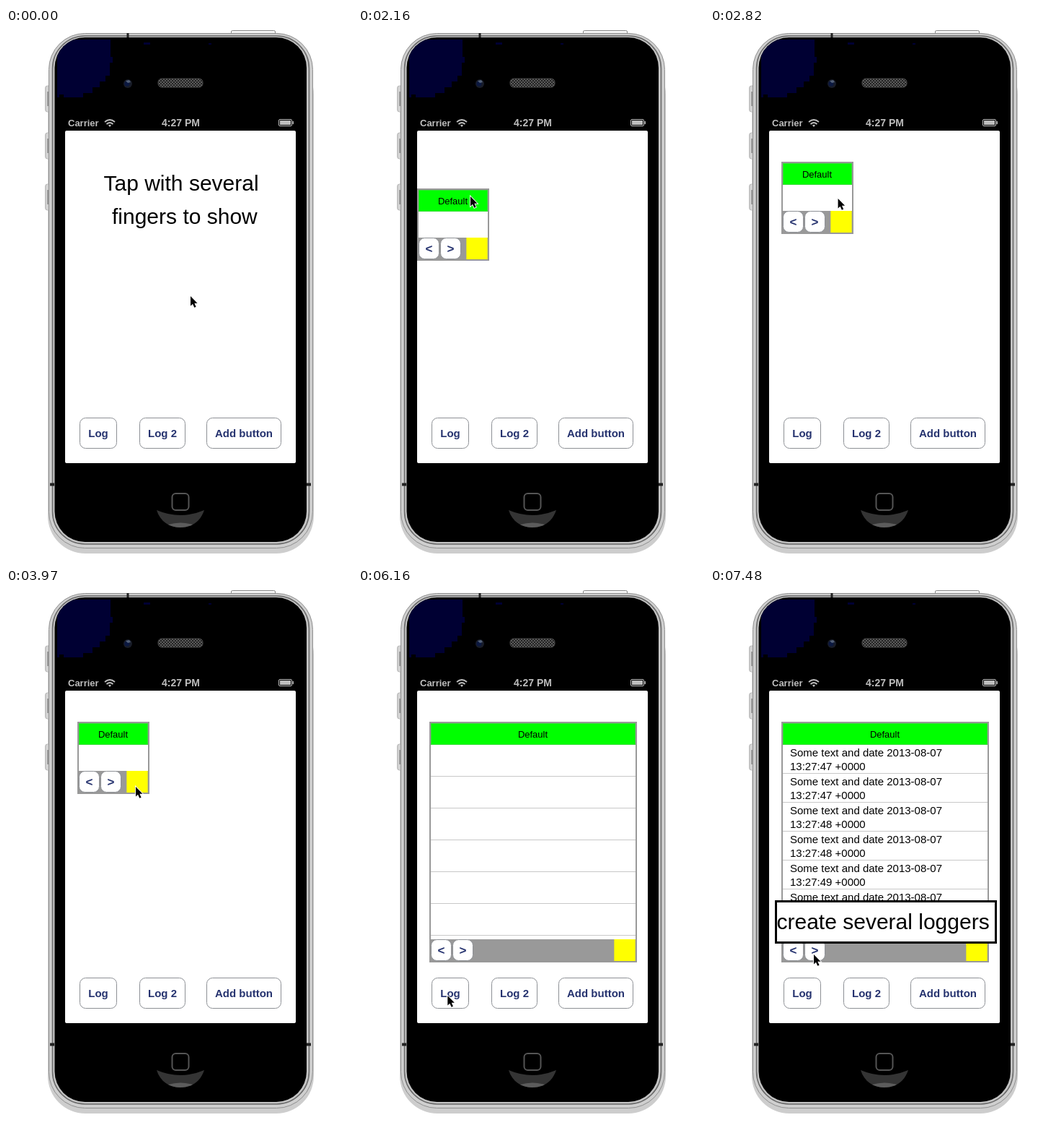
Animation, 480 px wide and 736 px high, one loop 8 s. Source, as an HTML page:

```html
<!DOCTYPE html>
<html lang="en">
<head>
<meta charset="utf-8">
<title>Log window demo</title>
<style>
html, body { margin: 0; width: 100%; height: 100%; overflow: hidden; background: #fff; }
svg { display: block; }
#stage { width: 100%; height: 100%; font-family: "Liberation Sans", Arial, sans-serif; }
.status { font-weight: bold; fill: #bdbdbd; }
.button rect { fill: #fff; stroke: #8d9095; }
.button text { font: bold 15px "Liberation Sans", Arial, sans-serif; fill: #26336f; text-anchor: middle; }
.caption { font-size: 30px; }
.edge { fill: none; stroke: #999; stroke-opacity: .35; }
#rows { font-size: 15px; }
</style>
</head>
<body>
<svg id="stage" viewBox="0 0 480 736">
  <defs>
    <pattern id="mesh" width="4" height="4" patternUnits="userSpaceOnUse">
      <path d="M0 0h4v4h-4z" fill="#222"/>
      <path d="M0 0h2v2h-2zM2 2h2v2h-2z" fill="#5c5c5c"/>
    </pattern>
    <clipPath id="face"><rect x="67.500" y="13" width="349.500" height="698" rx="42"/></clipPath>
  </defs>

  <rect x="58" y="40" width="369" height="687" rx="52" fill="#cdcdcd"/>
  <g id="keys"></g>
  <path d="M312.500 8v-3q0-1.500 2-1.500h57q2 0 2 1.500v3z" fill="#f4f4f4" stroke="#8a8a8a"/>
  <rect x="59.500" y="7.500" width="366" height="712" rx="50" fill="#cfcfcf" stroke="#8f8f8f"/>
  <rect x="64.500" y="11" width="356" height="703" rx="45" fill="#c4c4c4" stroke="#6a6a6a" stroke-width="1.500"/>
  <rect x="67.500" y="13" width="349.500" height="698" rx="42"/>
  <path d="M61 629.500h6v4h-6zM417 629.500h6v4h-6zM167.500 7h3v6h-3z" fill="#222"/>
  <path clip-path="url(#face)" fill="#000033" d="M71 16H145V40H148V48H144V66H138V74H130V82H120V90H107V96H80V92H74V96H71Z"/>
  <path d="M191 20h9v3h-9zM281 21h4v2h-4zM263 75h3v3h-3z" fill="#000033"/>
  <circle cx="169" cy="77" r="6" fill="#181c28"/>
  <circle cx="168" cy="77" r="3.500" fill="#0b1840"/>
  <path d="M166 73l5-1 2 3-4 1z" fill="#536078"/>
  <rect x="211" y="70" width="62" height="12" rx="5" fill="url(#mesh)" stroke="#444"/>
  <path d="M209 667Q242 681 275 667C270 683 257 691 242 691S214 683 209 667Z" fill="#343434"/>
  <path d="M225 687Q242 682 259 687Q251 691 242 691T225 687Z" fill="#5c5c5c"/>
  <rect x="230.500" y="644" width="23" height="23" rx="5" fill="#000" stroke="#555" stroke-width="2"/>

  <text class="status" x="86" y="136" font-size="13">Carrier</text>
  <text class="status" x="216" y="136" font-size="14">4:27 PM</text>
  <g fill="none" stroke="#bdbdbd" stroke-width="1.800">
    <path d="M137 130q7-6 14 0M139.500 133q4.500-4 9 0"/>
    <path d="M142 134.500q2-1.500 4 0l-2 2.500z" fill="#bdbdbd" stroke="none"/>
    <rect x="378.500" y="126.500" width="18" height="9" rx="1.500" stroke-width="1"/>
    <path d="M380 128h15v6h-15zM397.500 129h1.500v4h-1.500z" fill="#bdbdbd" stroke="none"/>
  </g>
  <rect x="82" y="142" width="320" height="460" rx="2" fill="#fff"/>
  <g id="buttons"></g>

  <svg id="win">
    <rect width="100%" height="100%" fill="#999"/>
    <rect id="title" x="2" y="2" height="30" fill="#0f0"/>
    <rect id="titleEdge" class="edge" x="2.500" y="2.500" height="29"/>
    <text id="name" y="22" font-size="13" text-anchor="middle">Default</text>
    <svg id="table" x="2" y="32">
      <rect width="100%" height="100%" fill="#fff"/>
      <g id="lines" stroke="#c8c8c8"></g>
      <g id="rows"></g>
    </svg>
    <g id="bar"></g>
    <g id="grip">
      <rect width="30" height="30" fill="#ff0"/>
      <path class="edge" d="M.5 0v30M29.500 0v30"/>
    </g>
  </svg>

  <g class="caption">
    <g id="tapHint">
      <text x="135.500" y="225">Tap with several</text>
      <text x="147" y="271">fingers to show</text>
    </g>
    <text id="logHint" x="154.500" y="468">log to window</text>
    <g id="createHint">
      <rect x="91.500" y="433.500" width="305" height="57" fill="#fff" stroke="#000" stroke-width="3"/>
      <text x="92.500" y="472">create several loggers</text>
    </g>
  </g>
  <path id="cursor" d="M0 0V13.500L3 10.800L5.300 15.800L7.600 14.800L5.400 9.800H9.500Z" stroke="#fff" stroke-width="1.800" paint-order="stroke"/>
</svg>

<script>
const LOOP = 8000;
const $ = id => document.getElementById(id);

function add(parent, tag, attrs, text) {
  const el = document.createElementNS('http://www.w3.org/2000/svg', tag);
  set(el, attrs);
  if (text) el.textContent = text;
  return parent.appendChild(el);
}
function set(el, attrs) {
  for (const k in attrs) el.setAttribute(k, attrs[k]);
}
function show(el, on) {
  el.style.display = on ? '' : 'none';
}
const clamp = v => Math.min(1, Math.max(0, v));

function button(parent, x, y, width, height, label, baseline, size = 15) {
  const g = add(parent, 'g', { class: 'button' });
  add(g, 'rect', { x, y, width, height, rx: 8 });
  add(g, 'text', { x: x + width / 2, y: baseline, style: `font-size:${size}px` }, label);
}

// Keys are [time, ...values]; monotone cubic between them.
function track(keys, t) {
  if (t <= keys[0][0]) return keys[0].slice(1);
  const n = keys.findIndex(k => k[0] > t);
  if (n < 0) return keys[keys.length - 1].slice(1);
  const a = keys[n - 1], b = keys[n], d = b[0] - a[0], u = (t - a[0]) / d;
  const slope = (i, c) => keys[i + 1] && keys[i]
    ? (keys[i + 1][c] - keys[i][c]) / (keys[i + 1][0] - keys[i][0]) : 0;
  const tangent = (i, c) => {
    const p = slope(i - 1, c), q = slope(i, c);
    return p * q <= 0 ? 0 : 2 * p * q / (p + q);
  };
  return a.slice(1).map((v, i) => {
    const c = i + 1, w = u * u * (3 - 2 * u);
    return v + (b[c] - v) * w
      + d * u * (1 - u) * ((1 - u) * tangent(n - 1, c) - u * tangent(n, c));
  });
}

const pointer = [
  [500, 256, 371], [740, 242, 340], [860, 242, 340], [1130, 156, 233],
  [2160, 156, 233], [2400, 160, 312], [2520, 165, 273], [2700, 173, 196], [2940, 180, 275],
  [3970, 180, 275], [4330, 368, 508], [4600, 124, 564],
  [6130, 124, 564], [6250, 126, 564], [7090, 126, 564], [7450, 144, 507]
];
const place = [[2160, 82, 222], [2430, 84, 301], [2520, 84, 280], [2730, 99, 185]];
const size = [[3970, 100, 100], [4340, 288, 333]];
const OPEN = 830;
const taps = [0, 1, 2, 3, 4, 5].map(i => 6280 + i * 150);

for (const y of [80, 145, 216]) {
  add($('keys'), 'rect', { x: 54.5, y, width: 9, height: 36, rx: 3, fill: '#d2d2d2', stroke: '#b8b8b8' });
  add($('keys'), 'rect', { x: 57, y: y + 8, width: 4, height: 20, fill: '#999' });
}
button($('buttons'), 102.5, 539.5, 51, 42, 'Log', 566);
button($('buttons'), 185.5, 539.5, 63, 42, 'Log 2', 566);
button($('buttons'), 278.5, 539.5, 103, 42, 'Add button', 566);
button($('bar'), 2.5, 0.5, 28, 29, '<', 21, 17);
button($('bar'), 32.5, 0.5, 28, 29, '>', 21, 17);

const lines = taps.map(() => add($('lines'), 'line', { x1: 0, x2: 284 }));
const rows = taps.map((_, i) => {
  const g = add($('rows'), 'g', { transform: `translate(10 ${i * 40})` });
  add(g, 'text', { y: 16 }, 'Some text and date 2013-08-07');
  add(g, 'text', { y: 35 }, `13:27:${47 + (i >> 1)} +0000`);
  return g;
});

function draw(t) {
  const [x, y] = track(place, t), [width, height] = track(size, t);
  set($('win'), { x, y, width, height });
  set($('title'), { width: width - 4 });
  set($('titleEdge'), { width: width - 5 });
  set($('name'), { x: width / 2 - 0.5 });
  set($('table'), { width: width - 4, height: height - 64 });
  set($('bar'), { transform: `translate(0 ${height - 32})` });
  set($('grip'), { transform: `translate(${width - 32} ${height - 32})` });
  show($('win'), t >= OPEN);

  const pitch = t < taps[0] ? 44 : 40;
  taps.forEach((tap, i) => {
    const fade = clamp((t - tap) / 90), ly = (i + 1) * pitch - 0.5;
    // A row that is fading in hides the separator beneath it.
    const hidden = t >= tap && fade < 1;
    set(rows[i], { opacity: fade });
    set(lines[i], { y1: ly, y2: ly, opacity: hidden ? fade : 1 });
  });

  show($('tapHint'), t < 500);
  show($('logHint'), t >= 4630 && t < 6130);
  show($('createHint'), t >= 7480);
  set($('cursor'), { transform: `translate(${track(pointer, t)})` });
}

const start = performance.now();
function tick() {
  draw((performance.now() - start) % LOOP);
  requestAnimationFrame(tick);
}
tick();
</script>
</body>
</html>
```
